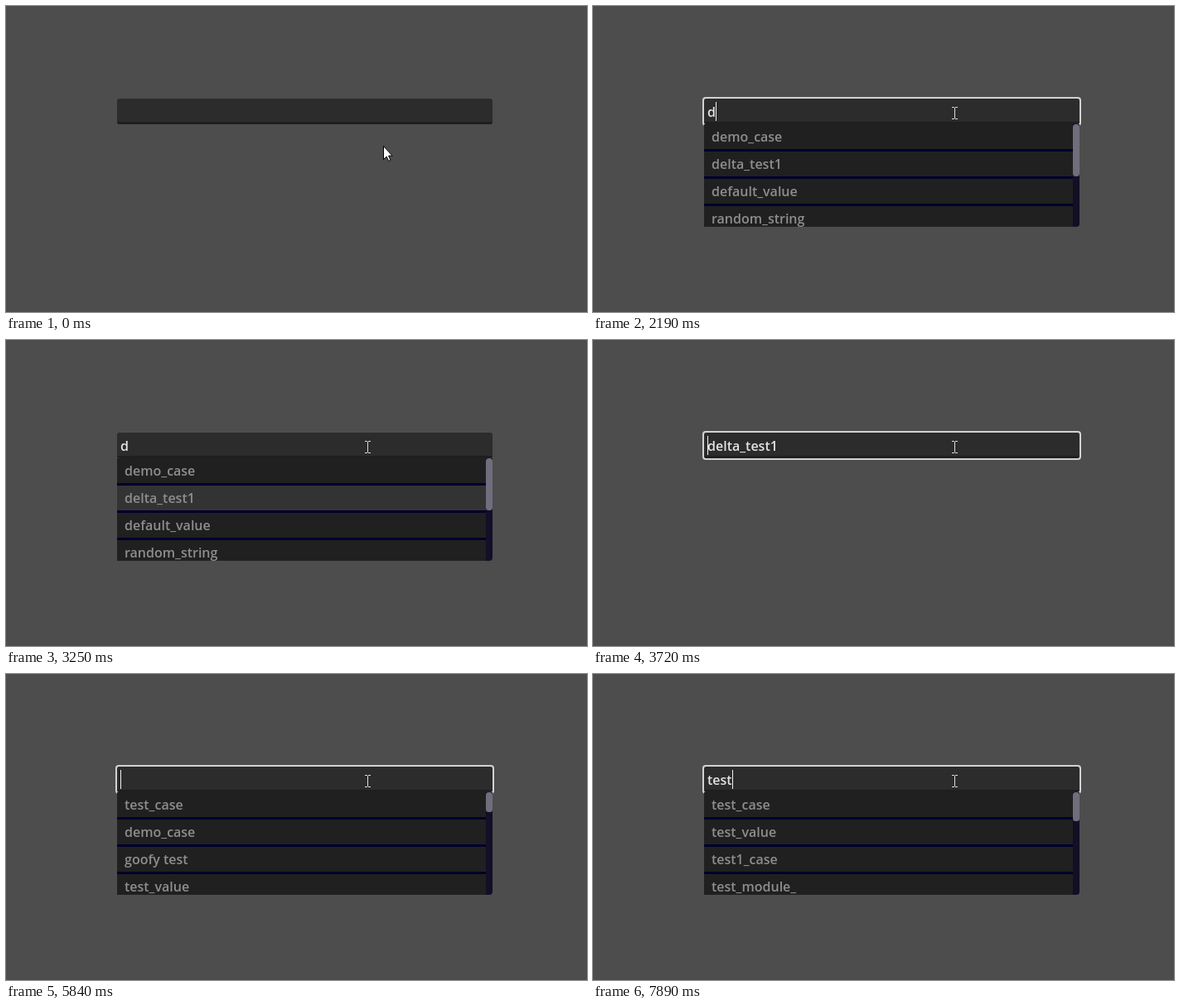
These frames come from a looping animation (701x370 px, 8000 ms). An HTML page:

```html
<!DOCTYPE html>
<html lang="en">
<head>
<meta charset="utf-8">
<title>Autocomplete field</title>
<style>
  html, body { margin: 0; width: 100%; height: 100%; overflow: hidden; background: #4d4d4d; }
  svg { display: block; width: 701px; height: 370px; }
  text { font: 600 16px "Open Sans", sans-serif; white-space: pre; }
  .crisp { shape-rendering: crispEdges; }
</style>
</head>
<body>
<svg viewBox="0 0 701 370">
  <defs>
    <clipPath id="fieldClip"><rect x="134" y="112" width="453" height="31" rx="3"/></clipPath>
    <clipPath id="listClip"><rect x="134" y="143" width="453" height="124"/></clipPath>
  </defs>
  <g clip-path="url(#fieldClip)">
    <rect x="134" y="112" width="453" height="31" fill="#2c2c2c"/>
    <rect x="134" y="140" width="453" height="3" fill="#1f1f1f"/>
  </g>
  <rect id="focus" x="133" y="111" width="455" height="33" rx="3" fill="none" stroke="#d2d2d2" stroke-width="2"/>
  <rect id="selection" class="crisp" x="138" y="116" width="85" height="23" fill="#808080"/>
  <text id="value" x="138" y="134" fill="#e4e4e4"></text>
  <rect id="caret" class="crisp" y="116" width="1" height="23" fill="#f2f2f2"/>
  <g id="list" clip-path="url(#listClip)">
    <rect class="crisp" x="134" y="143" width="445" height="124" fill="#00002e"/>
    <g id="rows"></g>
    <path d="M579 143h8v120a4 4 0 0 1-4 4h-4z" fill="#120f26"/>
    <rect id="thumb" x="579" y="143" width="8" rx="3.5" fill="#716d7d"/>
  </g>
  <path id="arrow" d="M.5.5v16l3.7-3.5 2.5 5.5 2.3-1-2.4-5.4h4.6z" fill="#fff" stroke="#000"/>
  <path id="beam" class="crisp" d="M-3 -7h3v1h1v-1h3v1h-3v13h3v1h-3v-1h-1v1h-3v-1h3v-13h-3z" fill="#dedede"/>
</svg>
<script>
const LOOP = 8000;
const ALL = ["test_case", "demo_case", "goofy test", "test_value"];
const D = ["demo_case", "delta_test1", "default_value", "random_string"];
const TEST = ["test_case", "test_value", "test1_case", "test_module_"];

// Each step changes only the listed properties.
const steps = [
  [0, { arrow: [455, 169], beam: null, focus: false, caret: null, value: "", selected: false, items: null, thumb: 24, active: -1 }],
  [70, { arrow: [449, 157] }],
  [140, { arrow: null, beam: [437, 131] }],
  [210, { beam: [436, 129] }],
  [540, { focus: true, caret: 138 }],
  [670, { items: ALL }],
  [2190, { value: "d", caret: 148, items: D, thumb: 63 }],
  [2920, { focus: false, caret: null, active: 0 }],
  [3250, { active: 1 }],
  [3720, { focus: true, caret: 138, value: "delta_test1", items: null, active: -1 }],
  [5110, { selected: true }],
  [5840, { selected: false, value: "", items: ALL, thumb: 24 }],
  [7620, { value: "t", caret: 144, items: TEST, thumb: 28 }],
  [7710, { value: "te", caret: 154, thumb: 35 }],
  [7800, { value: "tes", caret: 162 }],
  [7890, { value: "test", caret: 168 }]
];

let last = {};
const states = steps.map(([at, change]) => ({ at, ...(last = { ...last, ...change }) }));

const $ = id => document.getElementById(id);
const show = (id, on) => $(id).setAttribute("visibility", on ? "inherit" : "hidden");

function add(tag, attrs) {
  const el = document.createElementNS("http://www.w3.org/2000/svg", tag);
  for (const key in attrs) el.setAttribute(key, attrs[key]);
  return $("rows").appendChild(el);
}

const rows = ALL.map((_, i) => {
  const y = 143 + 33 * i;
  return {
    box: add("rect", { class: "crisp", x: 134, y, width: 445, height: 30 }),
    label: add("text", { x: 143, y: y + 21, fill: "#8e8e8e" })
  };
});

function place(id, pos) {
  show(id, pos);
  if (pos) $(id).setAttribute("transform", `translate(${pos})`);
}

function render(s) {
  place("arrow", s.arrow);
  place("beam", s.beam);
  show("focus", s.focus);
  show("selection", s.selected);
  show("caret", s.caret !== null);
  if (s.caret !== null) $("caret").setAttribute("x", s.caret);
  $("value").textContent = s.value;
  show("list", s.items);
  $("thumb").setAttribute("height", s.thumb);
  rows.forEach(({ box, label }, i) => {
    box.setAttribute("fill", i === s.active ? "#333333" : "#202020");
    label.textContent = s.items ? s.items[i] : "";
  });
}

let shown;
const start = performance.now();
function tick() {
  const t = (performance.now() - start) % LOOP;
  const state = states.findLast(s => s.at <= t);
  if (state !== shown) render(shown = state);
  requestAnimationFrame(tick);
}
tick();
</script>
</body>
</html>
```
